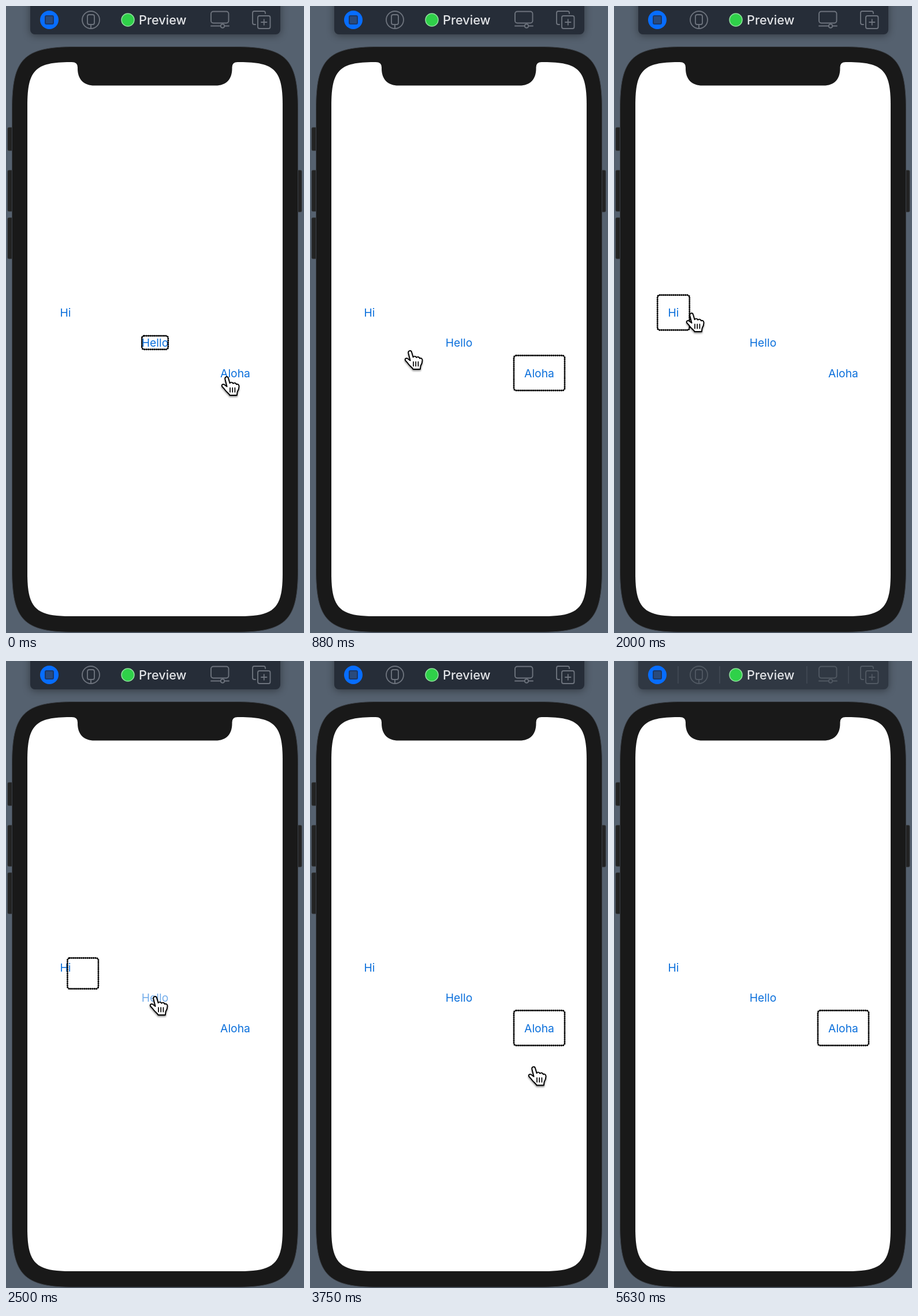
Recreate the animation shown at these times as an HTML page. Size 516 by 1084 pixels, loop 5760 ms.

```html
<!DOCTYPE html>
<html lang="en">
<head>
<meta charset="utf-8">
<title>Preview</title>
<style>
  html, body { margin: 0; width: 100%; height: 100%; overflow: hidden; background: #55616f; }
  svg { display: block; width: 100%; height: 100%; }
  text { font-family: Inter, "Open Sans", sans-serif; }
  .label { font-size: 19.3px; fill: #0a6fdb; text-anchor: middle; }
  .icon { fill: none; stroke: #6d737d; stroke-width: 1.9; stroke-linecap: round; stroke-linejoin: round; }
  .separators { stroke: #434b57; stroke-width: 1.5; display: none; }
  #bar { fill: #262d38; }
  .inactive #bar { fill: #303843; }
  .inactive .icon { stroke: #505862; }
  .inactive .separators { display: inline; }
  #barShadow { filter: drop-shadow(0 2px 7px #0006); }
  #hand { filter: drop-shadow(0 2px 1.5px #0007); }
</style>
</head>
<body>
<svg viewBox="0 0 516 1084" preserveAspectRatio="none">
  <rect width="516" height="1084" fill="#55616f"/>

  <g id="toolbar">
    <g id="barShadow"><rect id="bar" x="42" y="-20" width="433" height="69" rx="8"/></g>
    <path class="separators" d="M111 9V39M183 9V39M334 9V39M406 9V39"/>
    <circle cx="75" cy="24" r="16" fill="#076dff"/>
    <rect x="68" y="17" width="14" height="14" rx="2" fill="#2a4a7b" stroke="#1c3765" stroke-width="2"/>
    <g class="icon">
      <circle cx="147" cy="24" r="15"/>
      <rect x="141" y="15" width="12" height="17" rx="3"/>
      <path d="M147 32V39"/>
      <rect x="355" y="9.5" width="30.5" height="20" rx="4"/>
      <path d="M355 34.500H371M379 34.500H386"/>
      <circle cx="375" cy="34.5" r="3.3"/>
      <path d="M432 32H430Q427 32 427 29V12Q427 9 430 9H446Q449 9 449 12V13"/>
      <rect x="436" y="17" width="21.5" height="22" rx="3"/>
      <path d="M442 28H451.500M446.750 23.300V32.700"/>
    </g>
    <circle cx="211" cy="24" r="11" fill="#2fd149" stroke="#8fdf9c" stroke-width="1.5"/>
    <text x="230" y="32" font-size="21.7" font-weight="500" fill="#e3e5e8">Preview</text>
  </g>

  <g fill="#232323" stroke="#343638" stroke-width=".8">
    <rect x="3" y="210" width="11" height="40" rx="2"/>
    <rect id="sideButton" x="3" y="284" width="11" height="71" rx="2"/>
    <rect x="3" y="366" width="11" height="71" rx="2"/>
    <rect x="502" y="284" width="10" height="72" rx="2"/>
  </g>
  <path id="body" fill="#191919" stroke="#3c4148"/>
  <path id="screen" fill="#fff"/>
  <path fill="#191919" d="M114 96V97Q124 97 124 106V108C124 127 135 137.500 153 137.500H363C381 137.500 391.500 127 391.500 108V106Q391.500 97 401 97V96Z"/>

  <g id="labels"></g>
  <rect id="focus" rx="4" fill="none" stroke="#000" stroke-width="2.9" stroke-linecap="round" stroke-dasharray=".5 2.9"/>

  <g id="hand" stroke="#000" stroke-linecap="round" stroke-linejoin="round">
    <path fill="#fff" stroke-width="1.9" d="M-2.600 3.200C-3.400 -1.600 2 -2.200 3 1.500L5.600 10.200C6.500 8 10.500 8 11.200 10.800C12.500 8.800 16.500 9.400 17 12.400C18.800 10.800 21.800 12.400 21.500 16C21.400 20 20.500 22 18.600 25L17.800 31H5.600C4.500 28.500 1 26.500 -2.500 22C-4.500 19 -6 18 -8 15.600C-9.400 12 -5.400 11 -2.800 13.400L.6 16Z"/>
    <path fill="none" stroke-width="1.7" d="M6 18V25.500M10.200 18V25.500M14.400 18V25.500"/>
  </g>
</svg>
<script>
const LOOP = 5760, STEP = 125, LAST = 45, MOVE = 350, PRESS = 110, FADE = 230;
const $ = id => document.getElementById(id);
const set = (el, attrs) => { for (const k in attrs) el.setAttribute(k, attrs[k]); };
const mix = (a, b, p) => a + (b - a) * p;

// Rounded rectangle with continuous corners of extent e
function squircle(x, y, w, h, e) {
  const n = e * 0.19, r = x + w, b = y + h;
  return `M${x + e} ${y}H${r - e}C${r - n} ${y} ${r} ${y + n} ${r} ${y + e}` +
    `V${b - e}C${r} ${b - n} ${r - n} ${b} ${r - e} ${b}` +
    `H${x + e}C${x + n} ${b} ${x} ${b - n} ${x} ${b - e}` +
    `V${y + e}C${x} ${y + n} ${x + n} ${y} ${x + e} ${y}Z`;
}
set($('body'), { d: squircle(10.5, 70.5, 495, 1012, 108) });
set($('screen'), { d: squircle(37, 97, 442, 958, 74) });

const buttons = {
  Hi: { x: 103, y: 530, w: 55.5, h: 60.5 },
  Hello: { x: 258, y: 582, w: 45.5, h: 23.5 },
  Aloha: { x: 397, y: 634.5, w: 88, h: 60.5 }
};
for (const name in buttons) {
  const b = buttons[name];
  b.label = document.createElementNS('http://www.w3.org/2000/svg', 'text');
  b.label.textContent = name;
  set(b.label, { class: 'label', x: b.x, y: b.y + 7.2 });
  $('labels').append(b.label);
}

const taps = [
  { at: 250, from: 'Hello', to: 'Aloha' },
  { at: 1455, from: 'Aloha', to: 'Hi' },
  { at: 2393, from: 'Hi', to: 'Hello' },
  { at: 3186, from: 'Hello', to: 'Aloha' }
];

// Time and fingertip position
const route = [
  [0, 382, 642], [500, 382, 642], [750, 262, 660], [875, 173, 597], [1125, 118, 546],
  [1375, 108, 538], [1750, 108, 538], [2000, 134, 532], [2125, 196, 546], [2250, 256, 580],
  [2500, 258, 581], [2750, 262, 583], [2875, 333, 588], [3000, 393, 635], [3125, 406, 647],
  [3625, 406, 647], [3875, 368, 758], [4000, 198, 806], [4125, -50, 820]
];

// Cubic ease-in-out with handles at .42 and .58
function ease(p) {
  if (p <= 0 || p >= 1) return p <= 0 ? 0 : 1;
  let lo = 0, hi = 1;
  for (let i = 0; i < 20; i++) {
    const u = (lo + hi) / 2, v = 1 - u;
    if (1.26 * u * v * v + 1.74 * u * u * v + u ** 3 < p) lo = u; else hi = u;
  }
  return lo * lo * (3 - 2 * lo);
}

function pointer(t) {
  const i = route.findIndex(stop => stop[0] > t);
  if (i < 0) return route[route.length - 1].slice(1);
  const a = route[i - 1], b = route[i], p = (t - a[0]) / (b[0] - a[0]);
  return [mix(a[1], b[1], p), mix(a[2], b[2], p)];
}

function opacity(name, t) {
  const tap = taps.find(s => s.to === name && t >= s.at - PRESS && t < s.at + FADE);
  return tap ? mix(0.2, 1, Math.max(0, (t - tap.at) / FADE)) : 1;
}

function render(ms) {
  const t = Math.min(LAST, Math.floor((ms % LOOP) / STEP)) * STEP;
  const tap = taps.filter(s => s.at <= t).pop() || taps[0];
  const from = buttons[tap.from], to = buttons[tap.to], p = ease((t - tap.at) / MOVE);
  const [x, y, w, h] = ['x', 'y', 'w', 'h'].map(k => mix(from[k], to[k], p));
  set($('focus'), { x: x - w / 2, y: y - h / 2, width: w, height: h });
  for (const name in buttons) set(buttons[name].label, { opacity: opacity(name, t) });

  set($('hand'), { transform: `translate(${pointer(t)})`, visibility: t < 4125 ? 'visible' : 'hidden' });
  set($('toolbar'), { class: t >= 5375 ? 'inactive' : '' });
  const wide = t >= 4250 && t < 4750;
  set($('sideButton'), { x: wide ? 0 : 3, width: wide ? 14 : 11 });
}

const start = performance.now();
function tick() {
  render(performance.now() - start);
  requestAnimationFrame(tick);
}
tick();
</script>
</body>
</html>
```
